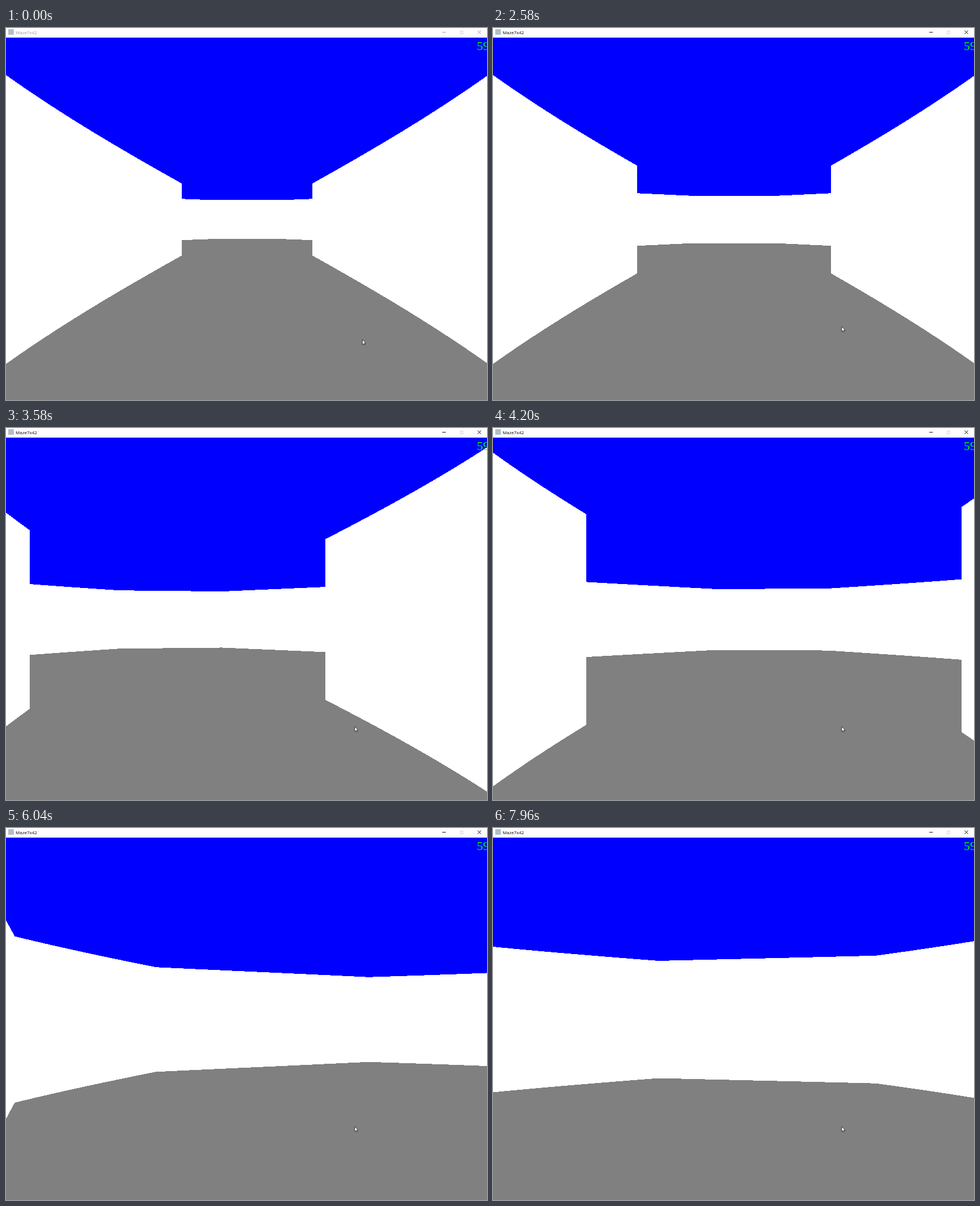
Animation of 851x658 px, one loop 8 s. Source, as an HTML page with a canvas:

```html
<!DOCTYPE html>
<html lang="en">
<head>
<meta charset="utf-8">
<title>Corridor walk</title>
<style>
  html, body { margin: 0; width: 100%; height: 100%; overflow: hidden; background: #fff; }
  canvas { display: block; }
</style>
</head>
<body>
<canvas id="stage" width="851" height="658"></canvas>
<script>
const W = 851, H = 658, BAR = 17, HORIZON = 338.75, CENTER = 426.5;
const HALF_FOV = 0.5, WALL = 467.7;
const LOOP = 8000, START = 1200, STEP = 76.8, FOCUS_AT = 1550;
const SPEED = 2.54e-3, TURN = 1.636e-3; // per ms
const ctx = document.getElementById('stage').getContext('2d');

// Right half of the floor plan: a corridor opening into an octagonal room.
const plan = [[1, -30], [1, 0], [3, 2.2], [3, 4.2], [1, 6.2], [-1, 6.2]];
const walls = plan.slice(1).flatMap(([bx, by], i) => {
  const [ax, ay] = plan[i];
  return [[ax, ay, bx, by], [-ax, ay, -bx, by]];
});

// When each key is held down, in ms.
const keys = {
  forward: [[1618, 3276], [3908, 4878], [5826, 7244]],
  back: [[7895, 7955]],
  left: [[2680, 2790], [3277, 3378], [3790, 4148], [4998, 5118], [5387, 5826]],
  right: [[2850, 2960], [3378, 3790], [4878, 4998], [5118, 5387], [6894, 8000]]
};
const held = (key, t) => keys[key].some(([from, to]) => t >= from && t < to);

// Walks the player from the start up to time t.
function pose(t) {
  let x = 0, y = -7.365, heading = 0;
  for (let ms = START; ms < t; ms++) {
    const dt = Math.min(1, t - ms);
    heading += TURN * dt * (held('right', ms) - held('left', ms));
    const move = SPEED * dt * (held('forward', ms) - held('back', ms));
    x += move * Math.sin(heading);
    y += move * Math.cos(heading);
  }
  return [x, y, heading];
}

// Distance along a ray to the nearest wall.
function cast(x, y, angle) {
  const dx = Math.sin(angle), dy = Math.cos(angle);
  let best = 1e3;
  for (const [ax, ay, bx, by] of walls) {
    const ex = bx - ax, ey = by - ay, det = dx * ey - dy * ex;
    if (Math.abs(det) < 1e-9) continue;
    const px = ax - x, py = ay - y;
    const dist = (px * ey - py * ex) / det;
    const along = (px * dy - py * dx) / det;
    if (dist > 0 && dist < best && along >= -1e-6 && along <= 1 + 1e-6) best = dist;
  }
  return best;
}

function drawView(t) {
  const [x, y, heading] = pose(t);
  ctx.fillStyle = '#00f';
  ctx.fillRect(0, 0, W, HORIZON);
  ctx.fillStyle = '#808080';
  ctx.fillRect(0, Math.floor(HORIZON), W, H);
  ctx.fillStyle = '#fff';
  for (let col = 0; col < W; col++) {
    const angle = (col + 0.5 - CENTER) / CENTER * HALF_FOV;
    const half = WALL / (cast(x, y, heading + angle) * Math.cos(angle));
    const top = Math.round(HORIZON - half);
    ctx.fillRect(col, top, 1, Math.round(HORIZON + half) - top);
  }
  ctx.fillStyle = '#0f0';
  ctx.font = '22px "Liberation Serif", serif';
  ctx.fillText('59', 833, 39);
}

function line(color, ...points) {
  ctx.strokeStyle = color;
  ctx.beginPath();
  points.forEach(([x, y]) => ctx.lineTo(x, y));
  ctx.stroke();
}

function drawBar(t) {
  const ink = t < FOCUS_AT ? '#999' : '#000';
  ctx.fillStyle = '#fff';
  ctx.fillRect(0, 0, W, BAR);
  ctx.fillStyle = '#b4bec8';
  ctx.fillRect(4, 2, 10, 10);
  ctx.fillStyle = ink;
  ctx.font = '8px "Open Sans", sans-serif';
  ctx.fillText('Maze7x42', 17, 10.7);
  ctx.lineWidth = 1;
  line(ink, [772, 7.5], [778, 7.5]);
  line(ink, [834.5, 4.5], [840.5, 10.5]);
  line(ink, [840.5, 4.5], [834.5, 10.5]);
  ctx.strokeStyle = '#d4d4d4';
  ctx.strokeRect(803.5, 5.5, 5, 5);
}

function drawPointer(t) {
  const k = Math.min(1, Math.max(0, (t - START) / (FOCUS_AT - START)));
  const arrow = new Path2D('M0 0V9L2 7.2 3.3 10 4.6 9.4 3.4 6.7 6 6.5Z');
  ctx.save();
  ctx.translate(630.5 - 13.5 * k, 551 - 23 * k);
  ctx.fillStyle = '#fff';
  ctx.fill(arrow);
  ctx.lineWidth = 0.7;
  ctx.strokeStyle = '#000';
  ctx.stroke(arrow);
  ctx.restore();
}

function frame(now) {
  // The picture advances in even steps after a still start.
  const t = now % LOOP;
  const tick = t < START ? 0 : START + STEP * Math.floor((t - START + 6) / STEP);
  drawView(tick);
  drawBar(tick);
  drawPointer(tick);
  requestAnimationFrame(frame);
}
frame(performance.now());
</script>
</body>
</html>
```
